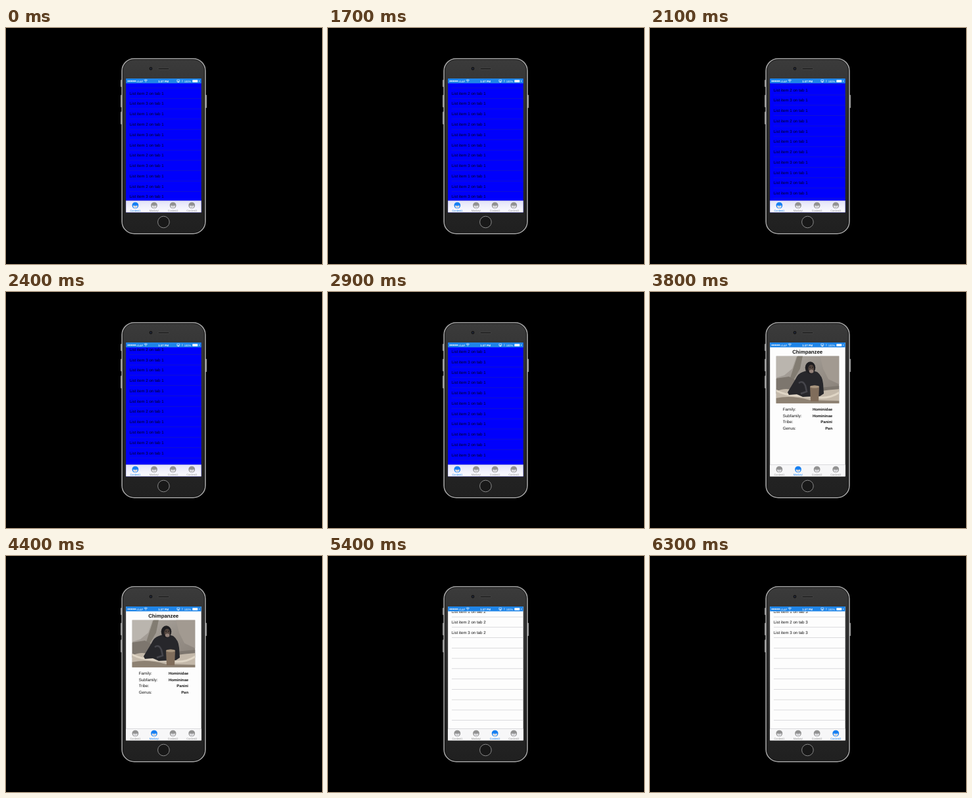
Write an HTML page that moves like this. It is 480 px wide and 360 px high and loops after 7.2 s.

```html
<!DOCTYPE html>
<html lang="en">
<head>
<meta charset="utf-8">
<title>Phone tabs</title>
<style>
  html, body { margin: 0; width: 100%; height: 100%; overflow: hidden; background: #000; }
  svg { display: block; width: 100vw; height: 100vh; }
  text { font-family: "Liberation Sans", Arial, sans-serif; text-rendering: geometricPrecision; }
  .b { font-weight: bold; }
</style>
</head>
<body>
<svg viewBox="0 0 480 360">
  <defs>
    <clipPath id="view"><rect x="182.2" y="84.5" width="114.4" height="179"/></clipPath>
    <clipPath id="frame"><rect x="191.7" y="97.8" width="95.5" height="71.9"/></clipPath>
    <linearGradient id="shell" x1="0" y1="0" x2="0" y2="1">
      <stop offset="0" stop-color="#3b3b3b"/><stop offset=".13" stop-color="#363636"/>
      <stop offset=".6" stop-color="#282828"/><stop offset="1" stop-color="#202020"/>
    </linearGradient>
    <linearGradient id="lilac" x1="0" y1="0" x2="0" y2="1">
      <stop offset="0" stop-color="#e2e2f8"/><stop offset=".55" stop-color="#f2f2fc"/><stop offset="1" stop-color="#fbfbff"/>
    </linearGradient>
    <linearGradient id="wall" x1="0" y1="0" x2="1" y2="1">
      <stop offset="0" stop-color="#b0aba5"/><stop offset=".5" stop-color="#989189"/><stop offset="1" stop-color="#857d75"/>
    </linearGradient>
  </defs>
  <rect width="480" height="360" fill="#000"/>

  <g fill="#8c8c8c">
    <rect x="174" y="79" width="2.8" height="11" rx="1"/>
    <rect x="174" y="102" width="2.8" height="19" rx="1"/>
    <rect x="174" y="127.5" width="2.8" height="19.5" rx="1"/>
    <rect x="302.3" y="102" width="2.8" height="20" rx="1"/>
  </g>
  <rect x="176.2" y="46.7" width="126.6" height="267" rx="18.5" fill="url(#shell)" stroke="#a4a4a4" stroke-width="1.6"/>
  <rect x="177.6" y="48.1" width="123.8" height="264.2" rx="17" fill="none" stroke="#151515" stroke-width=".8"/>
  <circle cx="220" cy="62" r="2.4" fill="#141414"/>
  <circle cx="220" cy="62" r="1" fill="#26304a"/>
  <rect x="231" y="61.2" width="17" height="1.8" rx=".9" fill="#080808" stroke="#666" stroke-width=".5"/>
  <circle cx="239.4" cy="296" r="8.8" fill="#181818" stroke="#8a8a8a" stroke-width="1"/>

  <rect id="page" x="182.2" y="77" width="114.4" height="204.3"/>
  <g id="list" clip-path="url(#view)"></g>

  <g id="card">
    <text class="b" x="239.2" y="94" font-size="7.8" text-anchor="middle" fill="#111">Chimpanzee</text>
    <g clip-path="url(#frame)">
      <rect x="191" y="97" width="97" height="73" fill="url(#wall)"/>
      <path d="M191 97h32l-7 20-12 10-13 4z" fill="#bab5ae"/>
      <path d="M258 97h30v44l-17-8-8-16z" fill="#a29a91"/>
      <path d="M224 97h8l-4 20-10 17-5-3z" fill="#827c72"/>
      <path d="M191 132l20-3 18 10 30 7 29-3v12H191z" fill="#7d766e"/>
      <path d="M191 152q14-7 27-2t34 2 36-4v22H191z" fill="#c4b9aa"/>
      <path d="M191 150q14 7 30 8t34 3 33-8" fill="none" stroke="#e0d6c6" stroke-width="3"/>
      <path d="M191 162q24-5 52 3l45 1v4H191z" fill="#8d8172"/>
      <path d="M232 122q10-5 22 0 8 6 9 18l1 15-6 4-26 1-9-4-12 1-2-4 12-20q4-9 11-11z" fill="#27272b"/>
      <ellipse cx="243.5" cy="115.5" rx="7.8" ry="9.2" fill="#1f1e21"/>
      <ellipse cx="244.8" cy="117" rx="4.4" ry="6" fill="#54463f"/>
      <ellipse cx="245.2" cy="121" rx="3.3" ry="2.8" fill="#94827a"/>
      <path d="M242 114.8h2M246 114.8h2" stroke="#191516" stroke-width="1.1"/>
      <path d="M226 139q6-5 10 4l2 9-9 3" fill="none" stroke="#45454b" stroke-width="2.5"/>
      <path d="M243 144q7-3 14 0l-1 23h-12z" fill="#806d5b"/>
      <ellipse cx="250" cy="144.5" rx="7" ry="2" fill="#a9967f"/>
    </g>
    <g id="facts" fill="#111"></g>
  </g>

  <rect x="182.2" y="77" width="114.4" height="7.4" fill="#1f85e8"/>
  <g id="status" fill="#fff" font-size="4.1">
    <text x="198" y="82.5">VL&amp;F</text>
    <path d="M209.8 79.7q2.5-1.8 5 0M210.8 80.9q1.5-1.1 3 0" fill="none" stroke="#fff" stroke-width=".7"/>
    <circle cx="212.3" cy="82" r=".6"/>
    <text x="239.2" y="82.5" font-size="4.3" text-anchor="middle" stroke="#fff" stroke-width=".12">1:37 PM</text>
    <path d="M259.8 79.2h4v2.6h-4z" fill="none" stroke="#fff" stroke-width=".6"/>
    <path d="M260.2 83l1.6-1.7 1.6 1.7z"/>
    <path d="M266.9 79.8l1.7 1.9-.9.9v-3.6l.9.9-1.7 1.8" fill="none" stroke="#fff" stroke-width=".4" opacity=".6"/>
    <text x="270.7" y="82.5">100%</text>
    <rect x="283.2" y="79.3" width="8" height="3.4" rx=".6"/>
    <rect x="293.2" y="80.2" width=".9" height="1.6"/>
  </g>

  <rect id="bar" x="182.2" y="263.5" width="114.4" height="17.8"/>
  <rect x="182.2" y="263.3" width="114.4" height=".5" fill="#b9b9bf"/>
  <g id="tabs"></g>
</svg>
<script>
const NS = "http://www.w3.org/2000/svg";
const $ = id => document.getElementById(id);

function add(parent, tag, attrs, label) {
  const el = document.createElementNS(NS, tag);
  for (const k in attrs) el.setAttribute(k, attrs[k]);
  if (label) el.textContent = label;
  parent.appendChild(el);
  return el;
}

const LOOP = 7200, STEP = 100, PITCH = 15.77, ROWS = 12;
const BLUE = "#1780f2", GREY = "#929292";

for (let i = 0; i < 5; i++) add($("status"), "circle", { cx: 185.6 + i * 2.6, cy: 81, r: 1.05 });

[["Family:", "Hominidae"], ["Subfamily:", "Homininae"], ["Tribe:", "Panini"], ["Genus:", "Pan"]]
  .forEach(([name, value], i) => {
    const y = 181.3 + i * 9.5;
    add($("facts"), "text", { x: 201.8, y, "font-size": 6.2 }, name);
    add($("facts"), "text", { x: 277, y, "font-size": 5.9, "text-anchor": "end", class: "b" }, value);
  });

const tabs = ["Content1", "Monkey!", "Content2", "Content3"].map((name, i) => {
  const x = 196.4 + i * 28.6;
  const g = add($("tabs"), "g", {});
  add(g, "path", { d: `M${x - 4.9} 270.4a4.9 4.7 0 0 1 9.8 0q0 3-2.2 4.3-2.7 1.6-5.4 0-2.2-1.3-2.2-4.3z` });
  add(g, "path", { d: `M${x - 3.4} 271q1.7-.8 3.4.4 1.7-1.2 3.4-.4-.2 3.5-3.4 3.9-3.2-.4-3.4-3.9z`, fill: "#f4f4f8" });
  add(g, "path", { d: `M${x - 2} 271.9h1.2M${x + .8} 271.9h1.2M${x - .8} 273.4h1.6`, stroke: "#666", "stroke-width": .7 });
  add(g, "text", { x, y: 279.6, "font-size": 3.9, "text-anchor": "middle" }, name);
  return g;
});

const rows = Array.from({ length: ROWS }, () => ({
  text: add($("list"), "text", { x: 187.7, "font-size": 6.15 }),
  line: add($("list"), "rect", { x: 188, width: 109, height: .6 })
}));

function ease(t, from, to) {
  const p = Math.min(1, Math.max(0, (t - from) / (to - from)));
  return 1 - (1 - p) ** 2;
}

// The first list is pulled past its end, held, then springs back
const pullAt = t => 11.9 * (ease(t, 2000, 2400) - ease(t, 2800, 3500));
const tabAt = t => t < 3800 ? 0 : t < 4700 ? 1 : t < 5600 ? 2 : 3;

function drawList(tab, t) {
  const first = tab === 0;
  const top = first ? 83.75 - pullAt(t) : 85.2;
  rows.forEach(({ text, line }, k) => {
    const y = top + k * PITCH;
    const shown = y > 84.5 && (first || k < 3);
    text.textContent = shown ? `List item ${k % 3 + 1} on tab ${first ? 1 : tab}` : "";
    text.setAttribute("y", y + 2.2);
    text.setAttribute("fill", first ? "#00001c" : "#111");
    line.setAttribute("y", y + 7.5);
    line.setAttribute("fill", first ? "#1c1cba" : "#c4c4c8");
  });
}

function draw(ms) {
  const t = Math.floor(ms / STEP) * STEP;
  const tab = tabAt(t);
  $("page").setAttribute("fill", tab ? "#fdfdfd" : "#0000fc");
  $("bar").setAttribute("fill", tab ? "#f7f7f8" : "url(#lilac)");
  $("card").style.display = tab === 1 ? "" : "none";
  $("list").style.display = tab === 1 ? "none" : "";
  if (tab !== 1) drawList(tab, t);
  tabs.forEach((g, i) => g.setAttribute("fill", i === tab ? BLUE : GREY));
}

const start = performance.now();
function tick() {
  draw((performance.now() - start) % LOOP);
  requestAnimationFrame(tick);
}
tick();
</script>
</body>
</html>
```
